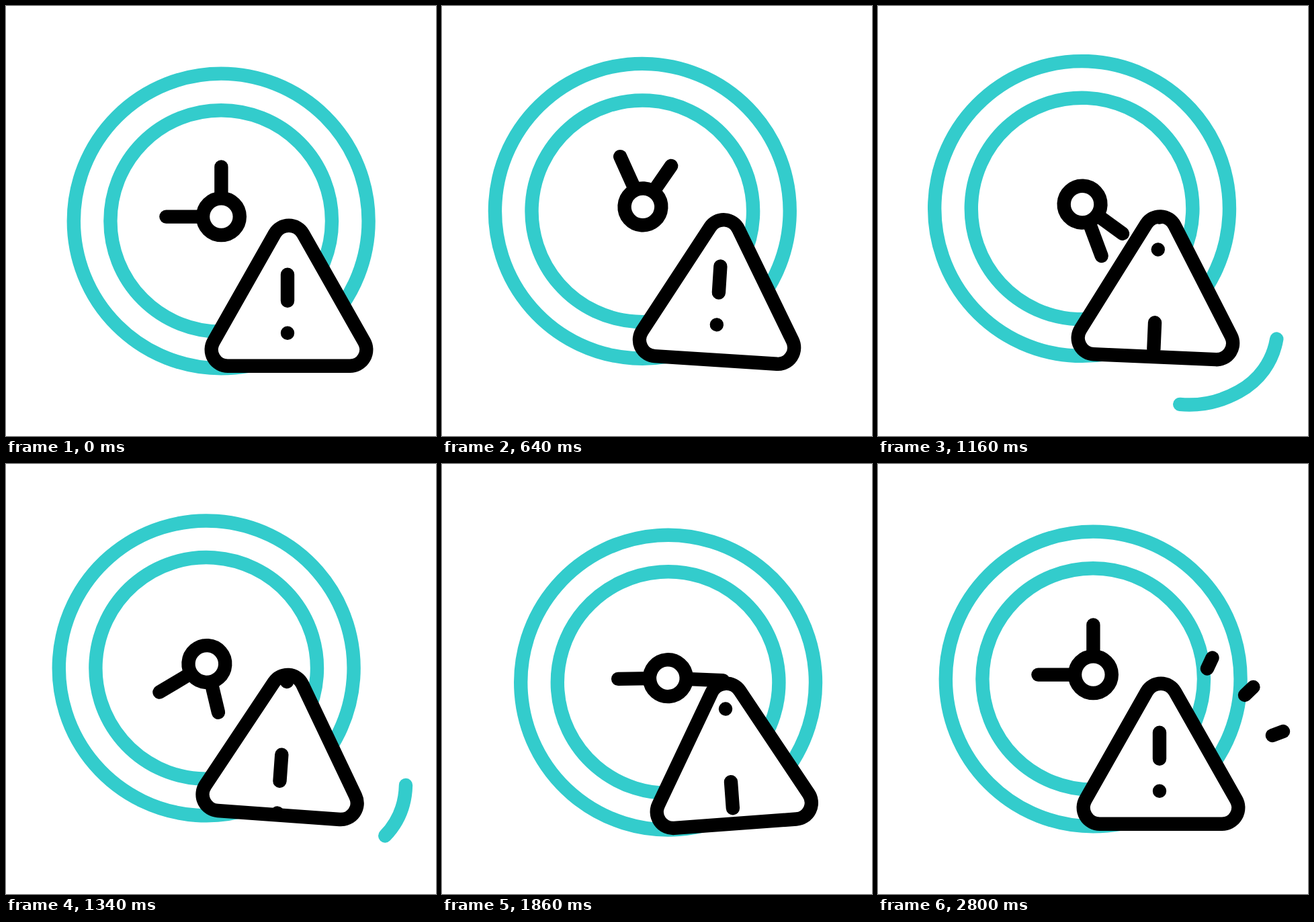
These frames come from a looping animation (640 px wide and 640 px high, 2820 ms). An HTML page:

```html
<!DOCTYPE html>
<html lang="en">
<head>
<meta charset="utf-8">
<title>Clock warning</title>
<style>
  html, body { margin: 0; width: 100%; height: 100%; overflow: hidden; background: #fff; }
  svg { display: block; width: 100vw; height: 100vh; }
  .line { fill: none; stroke: #000; stroke-width: 20.4; stroke-linecap: round; stroke-linejoin: round; }
  .teal { stroke: #3cc; }
  .solid { fill: #fff; }
</style>
</head>
<body>
<svg viewBox="0 0 640 640">
  <defs>
    <path id="shape" d="M512 535.8H330A24.3 24.3 0 0 1 308.9 499.5L399.9 339A24.3 24.3 0 0 1 442.1 339L533.1 499.5A24.3 24.3 0 0 1 512 535.8Z"/>
    <clipPath id="inside"><use href="#shape"/></clipPath>
    <path id="mark" d="M419 399.6V438.8M419 486.7h.01"/>
  </defs>
  <g id="clock">
    <circle class="line teal" cx="320.2" cy="320" r="219.4"/>
    <circle class="line teal" cx="320.2" cy="320" r="164.8"/>
    <g transform="translate(320.4 313.6)">
      <path id="minute" class="line" d="M0 -27V-74.2"/>
      <path id="hour" class="line" d="M0 -27V-82"/>
      <circle class="line solid" r="27.4"/>
    </g>
  </g>
  <path id="swoosh" class="line teal" d="M387 574C437 600 490 600 537 574C572 555 594 520 595 478"/>
  <g id="sign">
    <use href="#shape" class="line solid"/>
    <g clip-path="url(#inside)">
      <g id="marks" class="line">
        <use href="#mark"/>
        <use href="#mark" y="196"/>
      </g>
    </g>
  </g>
  <g id="ticks">
    <path class="line" d="M490 304.5L497.5 288.5"/>
    <path class="line" d="M546 344L558.5 332"/>
    <path class="line" d="M587 404L603 398"/>
  </g>
</svg>
<script>
const LOOP = 2820;
const el = id => document.getElementById(id);
const set = (id, name, value) => el(id).setAttribute(name, value);
const mix = (a, b, k) => a + (b - a) * k;

// Smooth progress from 0 to 1 between two times.
function ease(t, from, to) {
  const u = Math.min(1, Math.max(0, (t - from) / (to - from)));
  return u * u * (3 - 2 * u);
}

// Poses of the shake: rest, left, right, left, right, rest.
const poses = [
  { at: 140, x: 0, y: 0, tilt: 0, lift: 0 },
  { at: 540, x: -24.5, y: -22, tilt: 4.4, lift: -12.6 },
  { at: 860, x: 22.5, y: 8.8, tilt: -8.9, lift: 5.2 },
  { at: 1220, x: -22.9, y: -20.6, tilt: 4.3, lift: -14.8 },
  { at: 1740, x: 24.5, y: 12, tilt: -6.3, lift: 0 },
  { at: 1960, x: 0, y: 0, tilt: 0, lift: 0 }
];

// Sideways motion and tilt lag behind the vertical motion, so paths bend.
function shake(t) {
  const next = poses.findIndex(p => p.at > t);
  if (next < 1) return poses[0];
  const a = poses[next - 1], b = poses[next];
  const k = ease(t, a.at, b.at), lag = k * k;
  return {
    x: mix(a.x, b.x, lag), y: mix(a.y, b.y, k),
    tilt: mix(a.tilt, b.tilt, lag), lift: mix(a.lift, b.lift, k)
  };
}

// Shows the part of a path between two fractions of its length.
function trim(path, from, to) {
  const len = path.getTotalLength();
  path.style.visibility = to > from ? "visible" : "hidden";
  path.setAttribute("stroke-dasharray", `${(to - from) * len} ${len * 2}`);
  path.setAttribute("stroke-dashoffset", -from * len);
}

function draw(t) {
  const { x, y, tilt, lift } = shake(t);
  const turn = ease(t, 200, 2640);
  const scroll = 172 * (ease(t, 1580, 2370) - ease(t, 555, 1570));
  set("clock", "transform", `translate(${x} ${y}) rotate(${tilt} 320.2 320)`);
  set("minute", "transform", `rotate(${360 * turn})`);
  set("hour", "transform", `rotate(${720 * turn - 90})`);
  set("sign", "transform", `translate(0 ${lift}) rotate(${tilt} 421 324)`);
  set("marks", "transform", `translate(0 ${scroll})`);
  trim(el("swoosh"), ease(t, 980, 1550), ease(t, 650, 1255));
  for (const tick of el("ticks").children) trim(tick, 0, ease(t, 2500, 2800));
}

const start = performance.now();
function frame() {
  draw((performance.now() - start) % LOOP);
  requestAnimationFrame(frame);
}
frame();
</script>
</body>
</html>
```
